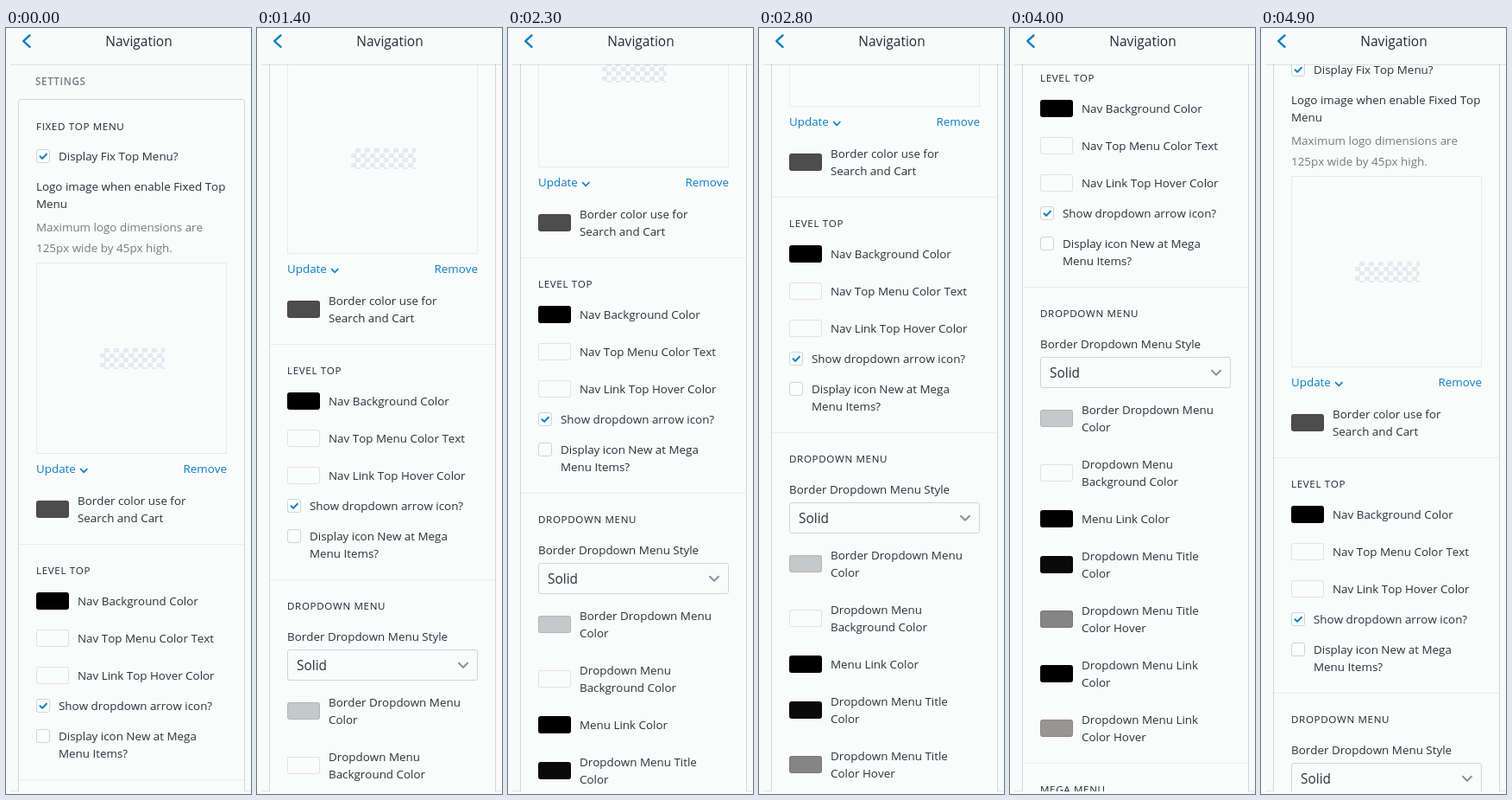
Recreate the animation shown at these times as an HTML page. Size 284 by 885 pixels, loop 5700 ms.

```html
<!DOCTYPE html>
<html lang="en">
<head>
<meta charset="utf-8">
<title>Navigation settings</title>
<style>
  html, body { margin: 0; height: 100%; overflow: hidden; background: #f9fbfa; }
  body { position: relative; font: 13.4px/20px "Open Sans", "Noto Sans", sans-serif; font-kerning: none; color: #2b3136; }
  body *, #card { position: absolute; box-sizing: border-box; white-space: nowrap; }

  header { left: 5px; right: 0; top: 0; height: 43px; border-bottom: 1px solid rgba(30, 50, 60, .12); }
  h1 { left: 0; width: 308px; top: 5px; margin: 0; font-size: 15.5px; font-weight: 500; text-align: center; color: #212b36; }
  footer { left: 5px; right: 0; top: 881px; height: 4px; border-top: 1px solid #dfe4e5; }

  main { left: 0; right: 0; top: 42px; height: 840px; overflow: hidden; }
  #page { left: 0; top: -42px; width: 284px; height: 1700px; animation: scroll 5.7s step-end infinite; }
  #card { left: 14px; top: 82px; width: 263px; height: 1618px; border: 1px solid #ccd8de; border-radius: 3px; background: #fafbfb; }

  .head { font-size: 11.6px; font-weight: 500; letter-spacing: .65px; color: #1c242c; }
  .title { font-weight: 600; color: #717c84; }
  .hint { color: #767c7e; }
  .link { color: #0a7fc4; }
  .big { font-size: 15.4px; }
  .rule { left: 15px; width: 261px; height: 1px; background: #e8eded; }
  .swatch { left: 35px; width: 38px; height: 20px; border: 1px solid rgba(0, 0, 0, .1); border-radius: 3px; }
  .check { left: 35px; width: 16px; height: 16px; border: 1px solid #cbd5dc; border-radius: 3px; background: #fcfdfd; }
  .picture { left: 35px; top: 271px; width: 221px; height: 221px; border: 1px solid #e6ebec; }
  .select { left: 35px; top: 949px; width: 221px; height: 36px; border: 1px solid #ccd5dc; border-radius: 3px; }
  .checker {
    left: 109px; top: 370px; width: 75px; height: 24px;
    background: repeating-conic-gradient(#e6e9ee 0 25%, #fbfcfc 0 50%) 0 0 / 11px 11px;
  }
  svg { overflow: visible; fill: none; stroke-linecap: round; stroke-linejoin: round; }

  @keyframes scroll {
    0%     { transform: none; }
    19.29% { transform: translateY(-27px); }
    21.05% { transform: translateY(-100px); }
    22.80% { transform: translateY(-169px); }
    24.56% { transform: translateY(-231px); }
    26.31% { transform: translateY(-282px); }
    28.07% { transform: translateY(-300px); }
    40.35% { transform: translateY(-331px); }
    42.10% { transform: translateY(-400px); }
    49.12% { transform: translateY(-401px); }
    50.87% { transform: translateY(-469px); }
    52.63% { transform: translateY(-560px); }
    54.38% { transform: translateY(-600px); }
    70.17% { transform: translateY(-569px); }
    71.92% { transform: translateY(-500px); }
    77.19% { transform: translateY(-469px); }
    78.94% { transform: translateY(-324px); }
    80.70% { transform: translateY(-231px); }
    82.45% { transform: translateY(-169px); }
    84.21% { transform: translateY(-118px); }
    85.96%, 100% { transform: translateY(-100px); }
  }
</style>
</head>
<body>
<footer></footer>
<main><div id="page"><div id="card"></div></div></main>
<header></header>
<h1>Navigation</h1>

<script>
  const page = document.getElementById('page');

  function add(cls, style = {}, text = '') {
    const el = document.createElement('div');
    el.className = cls;
    el.textContent = text;
    Object.assign(el.style, style);
    page.append(el);
  }

  // y is the middle of the first line
  function label(x, y, text, cls = '', pitch = 20) {
    text.split('\n').forEach((line, i) =>
      add(cls, { left: x + 'px', top: y - 10 + i * pitch + 'px' }, line));
  }

  function stroke(parent, d, color, width) {
    parent.insertAdjacentHTML('beforeend',
      `<svg style="left:0;top:0" width="1" height="1"><path d="${d}" stroke="${color}" stroke-width="${width}"/></svg>`);
  }

  function section(y, text) {
    if (y > 200) add('rule', { top: y - 31 + 'px' });
    label(35, y, text, 'head');
  }

  function swatch(y, color, text) {
    const lines = text.split('\n').length;
    add('swatch', { top: y - 10 + 'px', background: color });
    label(83, y - (lines - 1) * 10, text);
  }

  function checkbox(y, on, text) {
    add('check', { top: y - 8 + 'px' });
    if (on) stroke(page, `M39.5 ${y + .3}l2.6 2.6 4.8-5.2`, '#0a7fc4', 2);
    label(61, y, text);
  }

  label(34, 62, 'SETTINGS', 'head title');

  section(114, 'FIXED TOP MENU');
  checkbox(148, true, 'Display Fix Top Menu?');
  label(35, 183, 'Logo image when enable Fixed Top\nMenu');
  label(35, 230, 'Maximum logo dimensions are\n125px wide by 45px high.', 'hint', 24);
  add('picture');
  add('checker');
  label(35, 509, 'Update', 'link');
  stroke(page, 'M86.5 509.5l3.7 3.8 3.7-3.8', '#0a7fc4', 1.7);
  add('link', { right: '28px', top: '499px' }, 'Remove');
  swatch(556, '#4d4d4d', 'Border color use for\nSearch and Cart');

  section(627, 'LEVEL TOP');
  swatch(662, '#000', 'Nav Background Color');
  swatch(705, '#fbfcfc', 'Nav Top Menu Color Text');
  swatch(748, '#fbfcfc', 'Nav Link Top Hover Color');
  checkbox(783, true, 'Show dropdown arrow icon?');
  checkbox(818, false, 'Display icon New at Mega\nMenu Items?');

  section(899, 'DROPDOWN MENU');
  label(35, 934, 'Border Dropdown Menu Style');
  add('select');
  label(46, 968, 'Solid', 'big');
  stroke(page, 'M234 964.7l5 5 5-5', '#84929f', 2);
  swatch(1020, '#c4c9ca', 'Border Dropdown Menu\nColor');
  swatch(1083, '#fbfcfc', 'Dropdown Menu\nBackground Color');
  swatch(1136, '#000', 'Menu Link Color');
  swatch(1189, '#0a0a0a', 'Dropdown Menu Title\nColor');
  swatch(1252, '#858585', 'Dropdown Menu Title\nColor Hover');
  swatch(1315, '#000', 'Dropdown Menu Link\nColor');
  swatch(1378, '#999593', 'Dropdown Menu Link\nColor Hover');

  section(1449, 'MEGA MENU');

  stroke(document.body, 'M27.5 8.5l-7.3 6.7 7.3 6.7', '#0a7fc4', 2.4);
</script>
</body>
</html>
```
